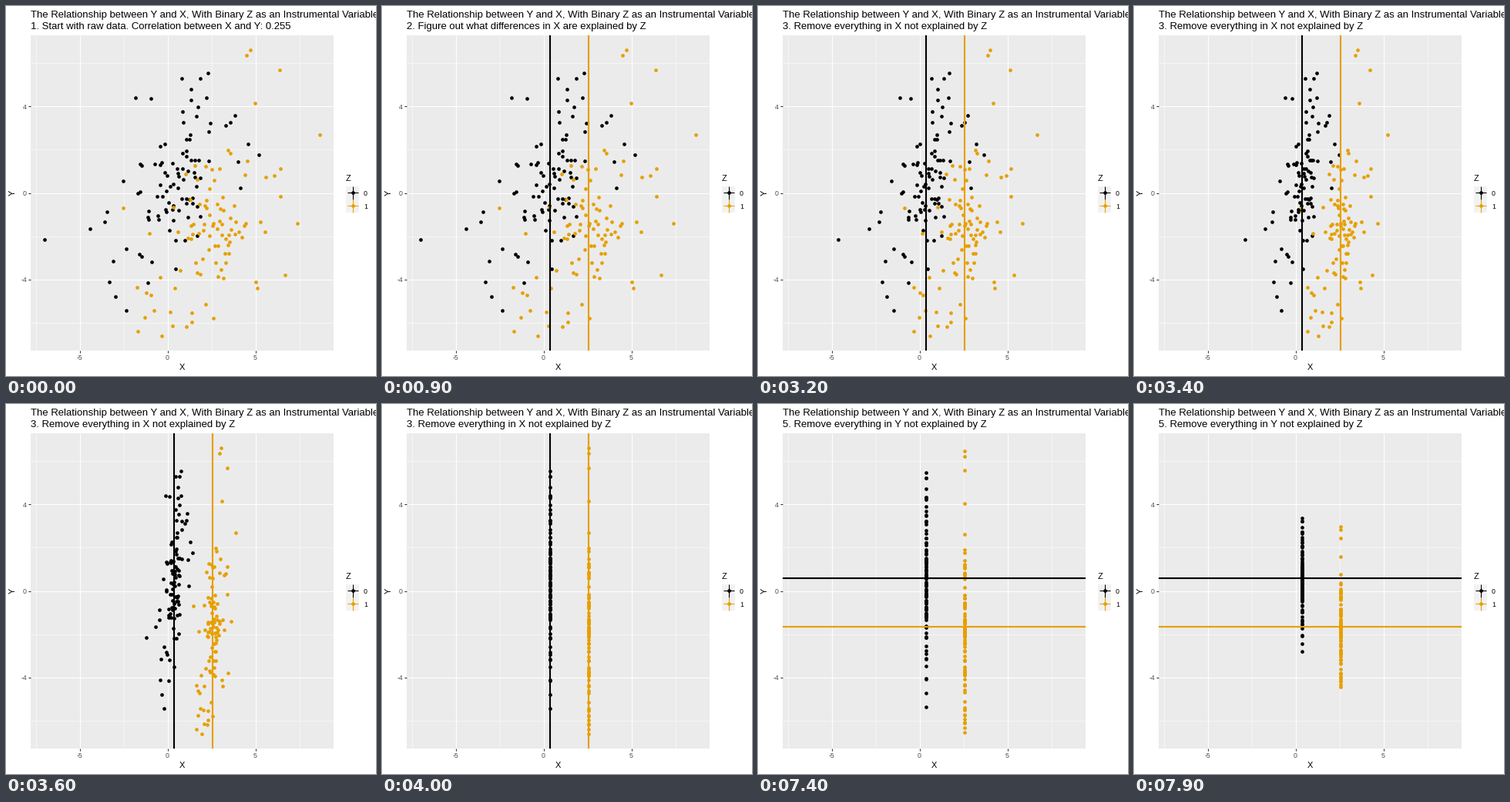
Animation, 480 px wide and 480 px high, one loop 8 s. Source, as a matplotlib script:

```python
import math

import matplotlib.pyplot as plt
import numpy as np
from matplotlib.animation import FuncAnimation
from matplotlib.patches import Rectangle

SIZE, DPI = 480, 100
PT = 72 / DPI                      # one pixel in points
LEFT, TOP, RIGHT, BOTTOM = 32, 38, 425, 447
X0, Y0, XU, YU = 209.5, 242.5, 22.8, 28.03
BLACK, ORANGE = "#000000", "#E69F00"
MEAN_X, MEAN_Y = (217.9, 267.9), (226, 289)
STEPS = 13

HEAD = "The Relationship between Y and X, With Binary Z as an Instrumental Variable"
STAGES = [
    (0, "1. Start with raw data. Correlation between X and Y: 0.255"),
    (5, "2. Figure out what differences in X are explained by Z"),
    (28, "3. Remove everything in X not explained by Z"),
    (51, "4. Figure out what differences in Y are explained by Z"),
    (74, "5. Remove everything in Y not explained by Z"),
]

# The sparse outer points are placed; the dense middle is sampled.
OUTER_0 = [
    (50, 303), (109, 289), (128, 280), (131, 267), (139, 331), (134, 358),
    (142, 377), (156, 395), (156, 315), (184, 359), (189, 332), (176, 325),
    (152, 227), (168, 119), (188, 120), (228, 94), (252, 94), (262, 87),
    (240, 108), (240, 122), (260, 119), (249, 131), (229, 137), (247, 143),
    (230, 151), (297, 142), (291, 151), (285, 155), (265, 152), (314, 179),
    (328, 193), (301, 202), (304, 236), (200, 182), (176, 207), (220, 341),
]
OUTER_1 = [
    (317, 57), (312, 64), (355, 83), (323, 126), (407, 167), (378, 282),
    (362, 349), (326, 366), (324, 358), (269, 405), (241, 398), (241, 410),
    (234, 416), (216, 415), (213, 397), (202, 428), (171, 422), (180, 404),
    (192, 395), (170, 365), (182, 372), (188, 375), (200, 352), (219, 366),
    (259, 387), (282, 353), (152, 262), (186, 295), (291, 191), (313, 201),
    (356, 211), (348, 220), (337, 222), (356, 247), (336, 293), (330, 280),
]


def sample(rng, n, center, spread, slope, box):
    """Correlated normal points kept inside a box and slightly apart."""
    x_lo, x_hi, y_lo, y_hi = box
    pts = []
    while len(pts) < n:
        dx = rng.normal(0, spread[0])
        x, y = center[0] + dx, center[1] + slope * dx + rng.normal(0, spread[1])
        inside = x_lo < x < x_hi and y_lo < y < y_hi
        if inside and all(math.hypot(x - a, y - b) > 3 for a, b in pts):
            pts.append((x, y))
    return pts


rng = np.random.default_rng(12)
GROUPS = [
    np.array(OUTER_0 + sample(rng, 64, (217, 240), (28, 36), -0.75,
                              (168, 278, 162, 322))) + 0.3,
    np.array(OUTER_1 + sample(rng, 64, (265, 282), (29, 36), -0.5,
                              (205, 312, 186, 352))) + 0.3,
]

fig = plt.figure(figsize=(SIZE / DPI, SIZE / DPI), dpi=DPI, facecolor="white")
ax = fig.add_axes([0, 0, 1, 1])
ax.set(xlim=(0, SIZE), ylim=(SIZE, 0))
ax.axis("off")


def text(x, y, s, px, color="black", **kw):
    return ax.text(x, y, s, fontsize=px * PT, color=color,
                   family="Liberation Sans", **kw)


def line(x, y, px, color, z):
    return ax.plot(x, y, color=color, lw=px * PT, zorder=z,
                   solid_capstyle="butt")[0]


def rect(x, y, w, h, color):
    ax.add_patch(Rectangle((x, y), w, h, fc=color, lw=0, zorder=0))


def dots(pts, color):
    pts = np.asarray(pts)
    return ax.scatter(pts[:, 0], pts[:, 1], s=(4.7 * PT) ** 2, c=color,
                      lw=0, zorder=3)


def draw_panel():
    rect(LEFT, TOP, RIGHT - LEFT, BOTTOM - TOP, "#EBEBEB")
    for v in (-7.5, -2.5, 2.5, 7.5):
        line([X0 + v * XU] * 2, [TOP, BOTTOM], 0.53, "white", 1)
    for v in (-6, -2, 2, 6):
        line([LEFT, RIGHT], [Y0 - v * YU] * 2, 0.53, "white", 1)
    for v in (-5, 0, 5):
        x = X0 + v * XU
        line([x, x], [TOP, BOTTOM], 1.07, "white", 2)
        line([x, x], [BOTTOM, BOTTOM + 2.75], 1.07, "#333333", 2)
        text(x, 459, str(v), 8.8, "#4D4D4D", ha="center")
    for v in (-4, 0, 4):
        y = Y0 - v * YU
        line([LEFT, RIGHT], [y, y], 1.07, "white", 2)
        line([LEFT - 2.75, LEFT], [y, y], 1.07, "#333333", 2)
        text(27, y + 3.2, str(v), 8.8, "#4D4D4D", ha="right")
    text(228.5, 472, "X", 11, ha="center")
    text(9, 242.5, "Y", 11, rotation=90, ha="center", va="center")


def draw_legend():
    text(441, 227, "Z", 11)
    for i, color in enumerate((BLACK, ORANGE)):
        y = 242.2 + 17.28 * i
        rect(441, y - 8.64, 17.28, 17.28, "#F2F2F2")
        line([449.6, 449.6], [y - 8.64, y + 8.64], 1.07, color, 2)
        line([442.7, 457], [y, y], 1.07, color, 2)
        dots([(449.8, y)], color)
        text(464, y + 3.3, str(i), 8.8)


draw_panel()
draw_legend()
text(32, 15, HEAD, 13.1)
caption = text(32, 30, "", 13.1)
clouds = [dots(p, c) for p, c in zip(GROUPS, (BLACK, ORANGE))]
x_lines = [line([x, x], [TOP, BOTTOM], 2.13, c, 4)
           for x, c in zip(MEAN_X, (BLACK, ORANGE))]
y_lines = [line([LEFT, RIGHT], [y, y], 2.13, c, 4)
           for y, c in zip(MEAN_Y, (BLACK, ORANGE))]


def remain(frame, start):
    """Share of the spread left, with sine ease in and out."""
    k = min(max(frame - start, 0), STEPS)
    return (1 + math.cos(math.pi * k / STEPS)) / 2


def update(frame):
    caption.set_text([s for t, s in STAGES if frame >= t][-1])
    keep = np.array([remain(frame, 27), remain(frame, 73)])
    for cloud, pts, mx, my in zip(clouds, GROUPS, MEAN_X, MEAN_Y):
        mean = np.array([mx, my])
        cloud.set_offsets(mean + (pts - mean) * keep)
    for ln in x_lines:
        ln.set_visible(9 <= frame < 51)
    for ln in y_lines:
        ln.set_visible(frame >= 55)
    return [caption, *clouds, *x_lines, *y_lines]


anim = FuncAnimation(fig, update, frames=80, interval=100, repeat=True,
                     repeat_delay=0, blit=False)
plt.show()
```
